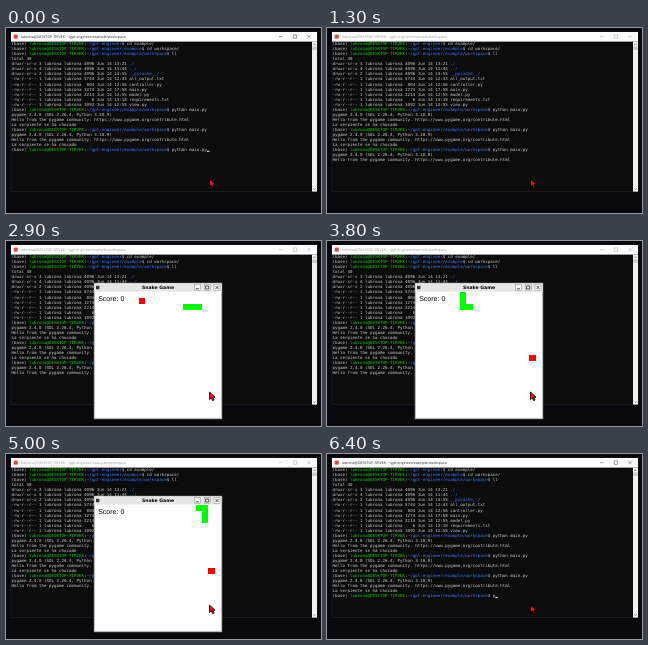
An HTML page for the animation above (6500 ms loop, 315 by 185 pixels).

```html
<!DOCTYPE html>
<html lang="en">
<head>
<meta charset="utf-8">
<title>Snake in a terminal</title>
<style>
  html, body { margin: 0; width: 100%; height: 100%; overflow: hidden; background: #09080d; }
  svg { display: block; width: 100vw; height: 100vh; }
  text { white-space: pre; text-rendering: geometricPrecision; }
  #term text { font: 41.6px "DejaVu Sans Mono", monospace; fill: #ccc; }
  #term .user { fill: #16c60c; }
  #term .path { fill: #3b78ff; }
  #title { font: 35.5px "Open Sans", sans-serif; }
  #bar { fill: #222; stroke: #222; }
  #bar.idle { fill: #999; stroke: #999; }
  #bar text { stroke: none; }
  #bar path { fill: none; stroke-width: .45; }
</style>
</head>
<body>
<svg viewBox="0 0 315 185" preserveAspectRatio="none">
  <rect width="315" height="185" fill="#09080d"/>

  <rect x="5" y="4" width="306" height="159.6" fill="#0c0c0c" stroke="#333336" stroke-width=".4"/>
  <rect x="5" y="4" width="306" height="9.6" fill="#fff"/>
  <rect x="7.7" y="6.6" width="4" height="4" fill="#e0453a"/>
  <g id="bar">
    <g transform="scale(.1)"><text id="title" x="148" y="98"></text></g>
    <path d="M273 8.6h3.6M287.2 6.9h3.4v3.4h-3.4zM301.3 6.9l3.4 3.4M304.7 6.9l-3.4 3.4"/>
  </g>
  <rect x="306" y="13.6" width="5" height="150" fill="#f0f0f0"/>
  <rect x="306.2" y="18.4" width="4.6" height="3.6" fill="#cdcdcd"/>
  <path d="M307.4 17l1.1-1.2 1.1 1.2M307.4 160.4l1.1 1.2 1.1-1.2" fill="none" stroke="#555" stroke-width=".6"/>

  <g id="term" transform="scale(.1)"></g>
  <rect id="caret" width="2.5" height="1.2" fill="#ddd"/>

  <g id="game">
    <rect x="88" y="42" width="128" height="136" fill="#d9d9d9" stroke="#777" stroke-width=".6"/>
    <rect x="88.4" y="42.4" width="127.2" height="8.1" fill="#e6e6e6"/>
    <rect x="90" y="44.8" width="3.4" height="3.4" fill="#333"/>
    <g transform="scale(.1)">
      <text x="1520" y="482" text-anchor="middle" style="font:bold 46px 'DejaVu Sans',sans-serif">Snake Game</text>
    </g>
    <g fill="#f6f6f6" stroke="#777" stroke-width=".4">
      <rect x="188.4" y="43.6" width="6" height="5.8"/>
      <rect x="198.2" y="43.6" width="6" height="5.8"/>
      <rect x="208" y="43.6" width="6" height="5.8"/>
    </g>
    <path d="M189.8 47.8h3.2M199.6 45h3.2v3h-3.2zM209.5 45l3 3M212.5 45l-3 3" fill="none" stroke="#111" stroke-width=".7"/>
    <rect x="89" y="50.5" width="126" height="126.2" fill="#fff"/>
    <g transform="translate(89 50.5) scale(6.3)" shape-rendering="crispEdges">
      <rect id="food" width="1" height="1" fill="#f00"/>
      <path id="snake" fill="#0f0"/>
    </g>
    <g transform="scale(.1)">
      <text x="922" y="601" style="font:70px 'Liberation Sans',Arial,sans-serif">Score: 0</text>
    </g>
  </g>

  <path d="M203.5 151v7.6l1.8-1.6 1.3 2.7 1.4-.7-1.3-2.6 2.4-.2z" fill="#f0101c" stroke="#000" stroke-width=".8"/>
</svg>
<script>
const $ = id => document.getElementById(id);
const LOOP = 6500, COL = 2.505, ROW = 5.04, LEFT = 5.5, TOP = 13.3;
const USER = 'lubrona', HOST = USER + '@DESKTOP-TIRVEK', HOME = '~/gpt-engineer';
const WORK = HOME + '/example/workspace';

const span = (cls, s) => `<tspan class="${cls}">${s}</tspan>`;
const prompt = (dir, cmd = '') =>
  `(base) ${span('user', HOST)}:${span('path', dir)}$ ${cmd}`;
const entry = (mode, links, size, time, name) =>
  `${mode} ${links} ${USER} ${USER} ${String(size).padStart(4)} Jun 14 ${time} ${name}`;
const dir = (links, time, name) => entry('drwxr-xr-x', links, 4096, time, span('path', name));
const file = (size, time, name) => entry('-rw-r--r--', 1, size, time, name);

const run = prompt(WORK, 'python main.py');
const hello = [
  'pygame 2.4.0 (SDL 2.26.4, Python 3.10.9)',
  'Hello from the pygame community. https://www.pygame.org/contribute.html'
];
const crash = 'La serpiente se ha chocado';
const lines = [
  prompt(HOME, 'cd example/'),
  prompt(HOME + '/example', 'cd workspace/'),
  prompt(WORK, 'll'),
  'total 40',
  dir(3, '13:21', './'),
  dir(4, '11:44', '../'),
  dir(2, '14:55', '__pycache__/'),
  file(5744, '12:43', 'all_output.txt'),
  file(804, '12:56', 'controller.py'),
  file(1274, '17:58', 'main.py'),
  file(2214, '12:55', 'model.py'),
  file(6, '13:18', 'requirements.txt'),
  file(1092, '12:55', 'view.py'),
  run, ...hello, crash,
  run, ...hello, crash,
  run, ...hello, crash,
  prompt(WORK, '<tspan id="typed">p</tspan>')
];
$('title').textContent = `${HOST}: ${WORK}`;
$('term').innerHTML = lines.map((s, i) =>
  `<text x="${LEFT * 10}" y="${(TOP + 3.9 + i * ROW) * 10}">${s}</text>`).join('');
const rows = [...$('term').children];
const typed = $('typed');

// The snake's whole route, cell by cell
const STEP = { R: [1, 0], L: [-1, 0], U: [0, -1], D: [0, 1] };
const route = [[8, 10]];
for (const [way, n] of [['R', 8], ['U', 8], ['L', 9], ['U', 2], ['R', 10], ['D', 9], ['R', 2]])
  for (let i = 0; i < n; i++) {
    const [x, y] = route[route.length - 1];
    route.push([x + STEP[way][0], y + STEP[way][1]]);
  }
const MEAL = 26;

const held = new Set([17, 23, 27, 31, 33, 39, 41, 49, 51, 53, 57, 59]);

const show = (el, on) => el.setAttribute('visibility', on ? 'visible' : 'hidden');
const place = (el, x, y) => { el.setAttribute('x', x); el.setAttribute('y', y); };

function caretAt(tick) {
  if (tick < 10) return [78, 21];
  if (tick < 12) return [0, 22];
  if (tick < 60) return null;
  if (tick < 62) return [0, 25];
  return [tick < 64 ? 64 : 65, 25];
}

function draw(tick) {
  const count = tick < 12 ? 22 : tick < 60 ? 24 : tick < 62 ? 25 : 26;
  rows.forEach((row, i) => show(row, i < count));
  typed.textContent = tick < 64 ? '' : 'p';

  const caret = caretAt(tick);
  show($('caret'), caret);
  if (caret) place($('caret'), LEFT + caret[0] * COL, TOP + caret[1] * ROW + 3.6);

  // The terminal loses focus just before the game window appears
  $('bar').classList.toggle('idle', tick >= 13 && tick < 61);
  const playing = tick >= 14 && tick < 61;
  show($('game'), playing);
  if (!playing) return;

  const head = Math.min(tick - 11, route.length - 1);
  const size = head < MEAL ? 3 : 4;
  $('snake').setAttribute('d', route.slice(head - size + 1, head + 1)
    .map(([x, y]) => `M${x} ${y}h1v1h-1z`).join(''));
  place($('food'), ...(head < MEAL ? [7, 1] : [18, 10]));
}

let last = -1;
const start = performance.now();
function loop() {
  let tick = Math.floor((performance.now() - start) % LOOP / 100);
  if (held.has(tick)) tick--;
  if (tick !== last) draw(last = tick);
  requestAnimationFrame(loop);
}
loop();
</script>
</body>
</html>
```
